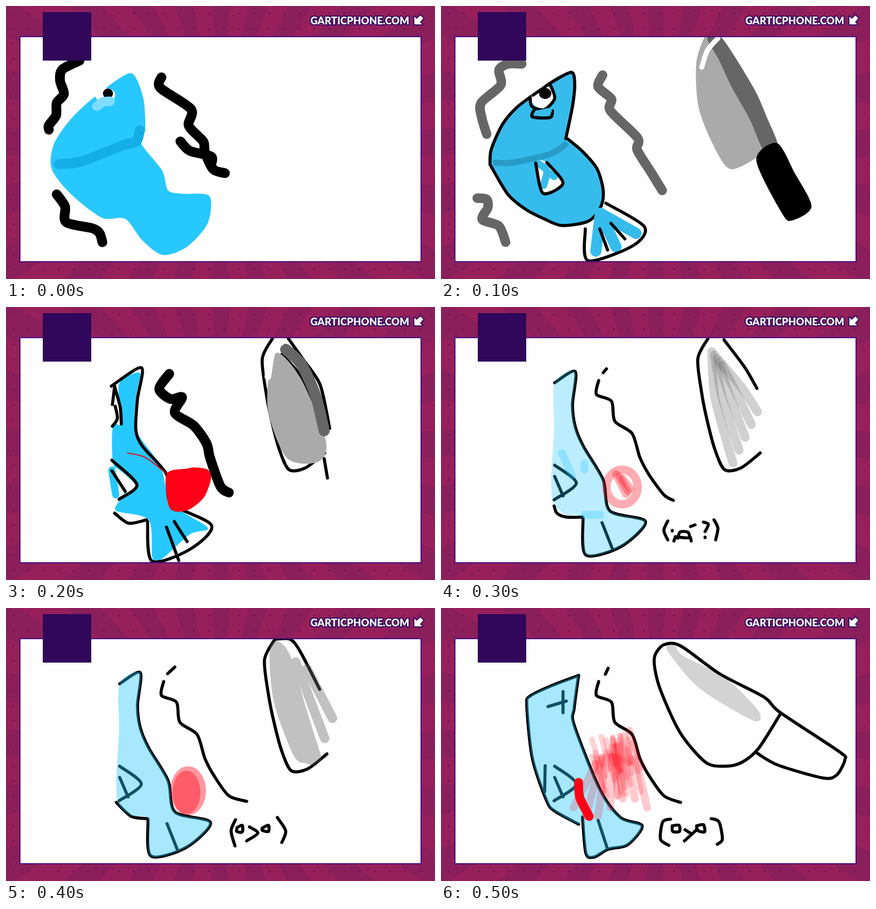
Animation of 770x490 px, one loop 600 ms. Source, as an HTML page:

```html
<!DOCTYPE html>
<html lang="en">
<head>
<meta charset="utf-8">
<title>Fish and knife</title>
<style>
html, body { margin: 0; width: 100%; height: 100%; overflow: hidden; background: #97205b; }
#bg { position: absolute; inset: 0; background:
  radial-gradient(circle, #7a1a58 1.8px, transparent 2.4px) 0 0 / 27px 27px,
  repeating-conic-gradient(from 4deg at 385px 245px, #97205b 0 7.5deg, #8b1f5b 7.5deg 15deg); }
svg { position: absolute; left: 0; top: 0; display: block; }
text { font: 900 18px Lato, "Open Sans", sans-serif; fill: #fff; stroke: #35095f; stroke-width: 4px; paint-order: stroke; stroke-linejoin: round; }
</style>
</head>
<body>
<div id="bg"></div>
<svg width="770" height="490" viewBox="0 0 770 490">
  <defs><clipPath id="paper"><rect x="26" y="56" width="718" height="402"/></clipPath></defs>
  <rect x="25" y="55" width="720" height="404" fill="#fefefe" stroke="#4b0f82" stroke-width="2"/>
  <g id="art" clip-path="url(#paper)" fill="none" stroke-linecap="round" stroke-linejoin="round"></g>
  <rect x="66" y="11" width="87" height="87" fill="#30075a"/>
  <text x="635" y="33" text-anchor="middle">GARTICPHONE.COM</text>
  <path d="M733 19l4 4 7-6 5 5-6 7 4 4h-14z" fill="#fff" stroke="#35095f" stroke-width="4" stroke-linejoin="round" paint-order="stroke"/>
</svg>
<script>
const STEP = 100, COUNT = 6;
const SKY = '#27c8ff', RED = '#ff0016', DIM = '#666', PALE = '#aaa', INK = '#000', PAPER = '#fefefe';
const art = document.getElementById('art');
let layer;

function node(name, attrs, parent = layer) {
  const el = document.createElementNS('http://www.w3.org/2000/svg', name);
  for (const k in attrs) el.setAttribute(k, attrs[k]);
  return parent.appendChild(el);
}

// Smooth curve through "x,y x,y ..." points.
function curve(str, closed) {
  const p = str.trim().split(/\s+/).map(s => s.split(',').map(Number));
  const n = p.length;
  const at = i => closed ? p[(i + n) % n] : p[Math.max(0, Math.min(n - 1, i))];
  let d = 'M' + p[0];
  for (let i = 0; i < (closed ? n : n - 1); i++) {
    const [a, b, c, e] = [at(i - 1), at(i), at(i + 1), at(i + 2)];
    const q = [0, 1].map(k => b[k] + (c[k] - a[k]) / 7);
    const r = [0, 1].map(k => c[k] - (e[k] - b[k]) / 7);
    d += `C${q} ${r} ${c}`;
  }
  return d + (closed ? 'Z' : '');
}

const line = (pts, width = 5.5, stroke = INK, opacity = 1) =>
  node('path', { d: curve(pts), stroke, 'stroke-width': width, opacity });
const lines = (list, ...style) => list.forEach(p => line(p, ...style));
const blob = (pts, fill, opacity = 1) => node('path', { d: curve(pts, true), fill, opacity });
const oval = (cx, cy, rx, ry, fill, more) => node('ellipse', { cx, cy, rx, ry, fill, ...more });
const repeat = (n, draw) => { for (let i = 0; i < n; i++) draw(i); };

// Draws into a nested group, for a shared shift or opacity.
function group(attrs, draw) {
  const outer = layer;
  layer = node('g', attrs);
  draw();
  layer = outer;
}

function random(seed) {
  return () => (seed = (seed * 16807) % 2147483647) / 2147483647;
}

// Parts that several drawings share.
const back = '204,136 241,116 236,175 241,215 256,251 291,310 303,366 367,385 323,430 260,445 255,379';

function trail(end) {
  line(`283,132 279,157 306,169 312,205 343,227 357,270 374,302 400,337 ${end}`);
}
function fin() {
  lines(['204,284 243,316 203,346', '204,304 219,339']);
}
function body(belly, opacity) {
  lines([back, belly, '289,387 308,435']);
  fin();
  blob(back + ' 225,373 202,352 198,310 203,220', SKY, opacity);
}
function blade(dx, edge) {
  group({ transform: `translate(${dx})` }, () => lines([
    '479,57 461,93 468,155 478,205 492,257 509,292 538,289 573,262', edge
  ]));
}

function calmFish() {
  lines([
    '132,98 101,114 97,134 104,158 91,174 90,196 77,214 77,222',
    '279,128 277,147 332,185 328,215 354,243 357,262 372,293 393,300',
    '313,243 330,260 368,270 368,285',
    '91,338 106,360 108,388 155,399 168,408 173,424'
  ], 17.5);
  blob(`215,123 232,127 247,168 250,222 243,247 280,295 291,331 318,337 365,341 362,390 325,432
    282,447 245,421 214,382 172,380 115,336 82,292 86,248 118,201 165,158`, SKY);
  line('95,284 135,279 210,250 234,243 240,223', 18, '#14aee6');
  oval(178, 160, 18, 13, PAPER);
  oval(183, 157, 9, 9, INK);
  line('163,180 175,172 187,171', 17, '#80dcff');
}

function knifeAppears() {
  const blue = '#36bcec';
  const head = '88,285 90,258 110,213 135,183 165,160 200,136 234,119 240,140 236,180 224,238';
  const belly = '228,239 255,262 280,292 291,330 287,360 265,386 217,394 185,382 152,365 120,338 90,288';
  lines([
    '145,104 120,104 104,115 107,142 72,174 73,200 82,230',
    '290,124 282,145 306,167 304,188 353,237 352,258 378,300 397,331',
    '65,345 82,347 84,362 74,383 104,395 116,424'
  ], 17, DIM);
  blob(head + ' ' + belly, blue);
  line('98,281 130,281 195,266 223,249', 11, '#279bc6');

  const flipper = '170,282 183,336 219,318 190,281';
  blob(flipper, PAPER);
  lines(['175,283 190,296 184,322', '190,297 203,306'], 13, blue);
  lines([head, belly, flipper]);

  oval(182, 163, 21, 21, PAPER);
  line('160,163 163,180 185,186 204,166 196,141');
  oval(187, 157, 11, 10, INK);
  line('165,160 200,136 215,127');
  lines(['168,185 164,199 196,200 200,188']);
  line('175,192 194,188', 10, blue);

  repeat(3, i => line(`286,372 ${278 + 36 * i},${440 - 8 * i * i}`, 20, blue));
  repeat(2, i => line(`${285 + 20 * i},${400 - 10 * i} ${299 + 31 * i},${438 - 20 * i}`));
  line('296,354 365,396 345,430 264,457 259,400');

  blob('473,56 458,105 463,185 495,262 522,293 572,268 590,240 535,130 485,56', PALE);
  blob('478,58 503,56 560,145 585,200 605,252 580,260 554,203 522,146 498,95', DIM);
  line('497,58 478,80 468,110', 9, PAPER);
  blob('566,277 603,246 635,300 665,360 630,385 612,372', INK);
}

function firstCut() {
  line('293,120 275,147 295,165 316,162 303,190 337,213 360,245 366,270 385,322 400,333', 17.5);
  blob(`203,138 240,118 234,160 233,220 277,285 297,352 362,396 330,408 280,452 263,450 256,382
    197,365 212,335 200,310 191,270 192,212 206,208`, SKY);
  blob('195,288 232,319 212,333', PAPER);
  line('190,293 197,337', 13, SKY);
  lines([
    '189,142 243,109 236,165 233,220 245,250 288,300 296,352 369,392 330,435 262,456 254,385',
    '195,370 220,388 252,382',
    '195,142 191,175', '195,143 205,180 207,210', '196,178 200,200 191,214',
    '190,275 235,319 203,345', '190,294 214,331',
    '288,395 310,455', '302,385 325,421'
  ]);
  blob('288,300 325,290 341,288 362,292 368,308 355,342 325,365 294,361', RED);
  line('218,262 250,270 287,298', 2, '#d81425');

  blade(-1, '508,57 535,95 565,140 582,218');
  lines(['495,85 530,125 556,180', '571,272 577,307']);
  blob('487,82 530,130 574,240 560,278 505,272 472,195 471,130', PALE);
  line('502,76 530,103 556,160 571,222', 20, DIM);
  line('495,62 478,80 470,125', 12, PAPER);
}

function tearyFace() {
  body('203,357 208,370 225,377 254,377', .3);
  line('291,118 297,111');
  trail('417,347');
  lines(['217,262 235,302', '257,281 258,292', '258,373 286,373'], 14, SKY, .3);

  oval(325, 323, 28, 31, 'none', { stroke: RED, 'stroke-width': 15, opacity: .32 });
  repeat(3, i => line(`${314 + 6 * i},${300 + 4 * i} ${332 + 4 * i},${336 - 5 * i}`, 14, RED, .3));

  blade(0, '508,59 545,108 567,146');
  repeat(5, i => line(
    `${486 + 5 * i},${80 + 6 * i} ${492 + 12 * i},${165 - 5 * i} ${524 + 11 * i},${280 - 23 * i}`, 16, DIM, .3));

  lines([
    '407,384 400,401 407,418', '415,401 415,402', '421,412 418,420',
    '425,415 429,404 443,404 445,414 427,413', '448,414 449,420', '448,394 456,391',
    '471,386 480,390 474,403', '474,413 474,414', '490,382 497,397 493,418'
  ]);
}

function wideFace() {
  body('254,378 225,374 198,349', .4);
  line('290,118 303,106');
  trail('432,347');
  oval(327, 328, 32, 44, RED, { opacity: .4 });
  oval(324, 331, 25, 39, RED, { opacity: .4 });

  blade(3, '481,56 507,56 525,78 560,146');
  group({ opacity: .4 }, () => {
    blob('475,66 510,85 558,265 535,278 515,262 480,165', DIM);
    repeat(3, i => line(`${500 + 20 * i},${85 + 12 * i} ${558 + 14 * i},${270 - 36 * i}`, 17, DIM));
  });

  lines([
    '412,380 404,400 411,427', '415,394 424,390 424,402 414,401 415,394',
    '437,393 452,404 432,418', '460,395 471,390 471,401 460,399 460,395',
    '487,376 502,400 495,421'
  ]);
}

function deepCut() {
  const side = '247,121 197,140 160,158 154,175 164,270 190,347 205,365 247,388';
  const spine = '254,375 260,440 275,447 300,433 335,425 361,391 322,376 285,325 239,210 239,180 247,121';
  lines([side, spine, '187,283 186,330', '219,150 219,188', '192,177 225,167',
    '282,381 299,433', '295,119 300,108']);
  fin();
  trail('430,349');
  blob(side + ' ' + spine, SKY, .4);

  // Loose scribble of short, nearly upright strokes.
  const rnd = random(41);
  repeat(30, () => {
    const x = 312 + (rnd() + rnd() - 1) * 46, top = 228 + rnd() * 50;
    const low = 275 + rnd() * 65, lean = 6 + rnd() * 14;
    line(`${x - lean / 2},${top} ${x + lean / 2},${low}`, 10, RED, .17);
  });
  repeat(7, i => line(`${278 + 10 * i},${280 - 10 * i} ${238 + 22 * i},${358 + 18 * Math.sin(i * 1.05)}`, 14, RED, .2));
  line('247,313 249,340 266,374', 16, RED);

  blob('405,66 420,68 435,86 510,125 570,185 560,202 465,145 412,85', DIM, .28);
  lines([
    '608,192 570,252 540,277 510,284 475,277 430,225 395,150 384,110 384,85 400,66 430,68 500,118 580,160 608,187 715,258 725,272 710,300 685,305 605,282 568,261',
    '412,379 398,384 394,415 409,426', '415,391 427,390 428,401 416,401 415,391',
    '438,398 449,405', '460,397 437,418', '459,391 471,389 473,402 460,399 459,391',
    '485,378 499,384 505,415 496,424'
  ]);
}

[calmFish, knifeAppears, firstCut, tearyFace, wideFace, deepCut].forEach((draw, i) => {
  layer = node('g', { opacity: i ? 0 : 1 }, art);
  draw();
  layer.animate([
    { opacity: 1, offset: 0, easing: 'step-end' },
    { opacity: 0, offset: 1 / COUNT },
    { opacity: 0, offset: 1 }
  ], { duration: STEP * COUNT, iterations: Infinity, delay: STEP * (i - COUNT) });
});
</script>
</body>
</html>
```
